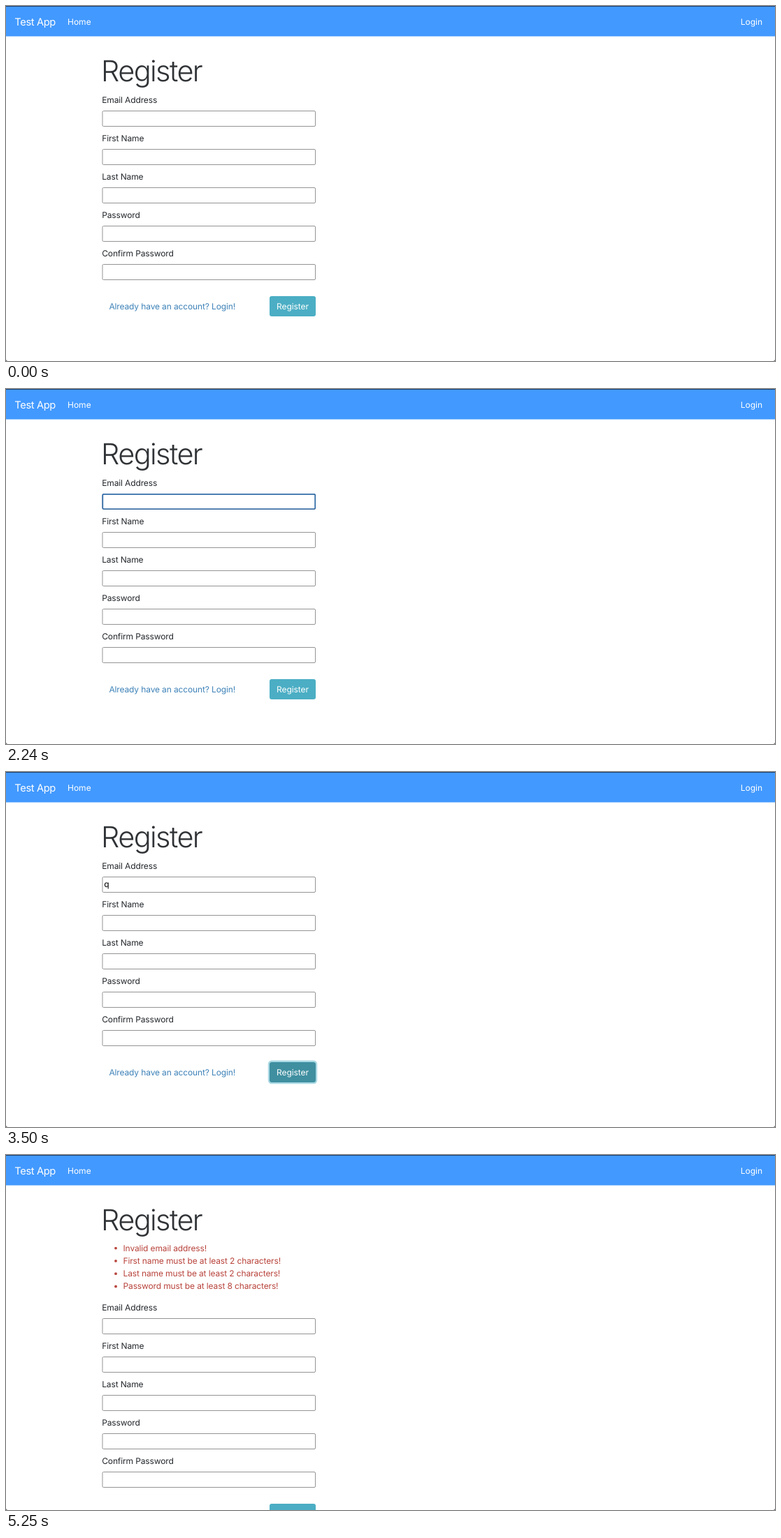
Write an HTML page that moves like this. It is 1100 px wide and 509 px high and loops after 5460 ms.

```html
<!DOCTYPE html>
<html lang="en">
<head>
<meta charset="utf-8">
<title>Register</title>
<style>
  html, body { margin: 0; width: 100%; height: 100%; overflow: hidden; background: #fff; }
  svg { display: block; }
  text { font: 12px Inter, "Open Sans", sans-serif; letter-spacing: -.13px; fill: #24282c; text-rendering: geometricPrecision; }
  .nav text { fill: #fff; letter-spacing: 0; }
  .nav .brand { font-size: 14.7px; letter-spacing: -.38px; }
  .title { font-size: 41.5px; font-weight: 300; letter-spacing: -1.6px; fill: #303336; }
  .field { fill: #fff; stroke: #949494; }
  .errors text, .errors circle { fill: #b8443c; }
  .link { fill: #3e82b8; }
  .action { fill: #fff; letter-spacing: -.05px; text-anchor: middle; }
</style>
</head>
<body>
<svg width="1100" height="509" viewBox="0 0 1100 509">
  <g class="nav">
    <rect width="1100" height="43.5" fill="#4299ff"/>
    <rect width="1100" height="1" fill="#1d3f6b"/>
    <text class="brand" x="12.3" y="27.5">Test App</text>
    <text x="88" y="27">Home</text>
    <text x="1050.7" y="27">Login</text>
  </g>
  <text class="title" x="136" y="108">Register</text>
  <g class="errors" id="errors"></g>
  <g id="form">
    <g id="fields"></g>
    <rect id="focus" x="138.3" y="150.8" width="303.9" height="21.2" rx="1.5" fill="none" stroke="#316ba8" stroke-width="1.7"/>
    <text id="typed" x="140.2" y="165.3" style="fill:#000">q</text>
    <rect id="caret" y="154.5" width="1" height="13" fill="#222"/>
    <text class="link" x="147.4" y="435">Already have an account? Login!</text>
    <rect id="ring" x="376" y="414.8" width="68" height="31.2" rx="4" fill="none" stroke="#a9d9e4" stroke-width="2.4"/>
    <rect id="button" x="377" y="416" width="66" height="29" rx="3"/>
    <text class="action" x="410" y="435">Register</text>
  </g>
  <path d="M0 507v2h2zM1100 507v2h-2z" fill="#777"/>
</svg>
<script>
const LOOP = 5460, FOCUS = 840, TYPE = 2520, HOVER = 3150, PRESS = 3360, SUBMIT = 3570;
const BLINKS = [[FOCUS, 1330], [1820, 2240], [TYPE, 3020]];
const FADE = 150;
const $ = id => document.getElementById(id);

$('fields').innerHTML = ['Email Address', 'First Name', 'Last Name', 'Password', 'Confirm Password']
  .map((label, i) => `<text x="137.2" y="${139 + 55 * i}">${label}</text>
    <rect class="field" x="138" y="${150.5 + 55 * i}" width="304.5" height="22" rx="1.5"/>`).join('');

$('errors').innerHTML = ['Invalid email address!', 'First name must be at least 2 characters!',
  'Last name must be at least 2 characters!', 'Password must be at least 8 characters!']
  .map((message, i) => `<circle cx="157" cy="${133.6 + 18.3 * i}" r="1.9"/>
    <text x="167.5" y="${137.5 + 18.3 * i}">${message}</text>`).join('');

const show = (id, on) => $(id).style.display = on ? '' : 'none';
const fade = (t, start) => {
  const p = Math.min(1, Math.max(0, (t - start) / FADE));
  return p * p * (3 - 2 * p);
};
const mix = (a, b, p) => `rgb(${a.map((v, i) => Math.round(v + (b[i] - v) * p))})`;

function draw(t) {
  const sent = t >= SUBMIT;
  show('errors', sent);
  $('form').setAttribute('transform', `translate(0 ${sent ? 84 : 0})`);
  show('focus', t >= FOCUS && t < PRESS);
  show('typed', t >= TYPE && !sent);
  show('caret', BLINKS.some(([on, off]) => t >= on && t < off));
  $('caret').setAttribute('x', t < TYPE ? 140.5 : 147.3);
  $('button').setAttribute('fill', mix([75, 174, 196], [63, 143, 160], sent ? 0 : fade(t, HOVER)));
  $('ring').setAttribute('opacity', sent ? 0 : fade(t, PRESS));
}

const start = performance.now();
function tick() {
  draw((performance.now() - start) % LOOP);
  requestAnimationFrame(tick);
}
tick();
</script>
</body>
</html>
```
